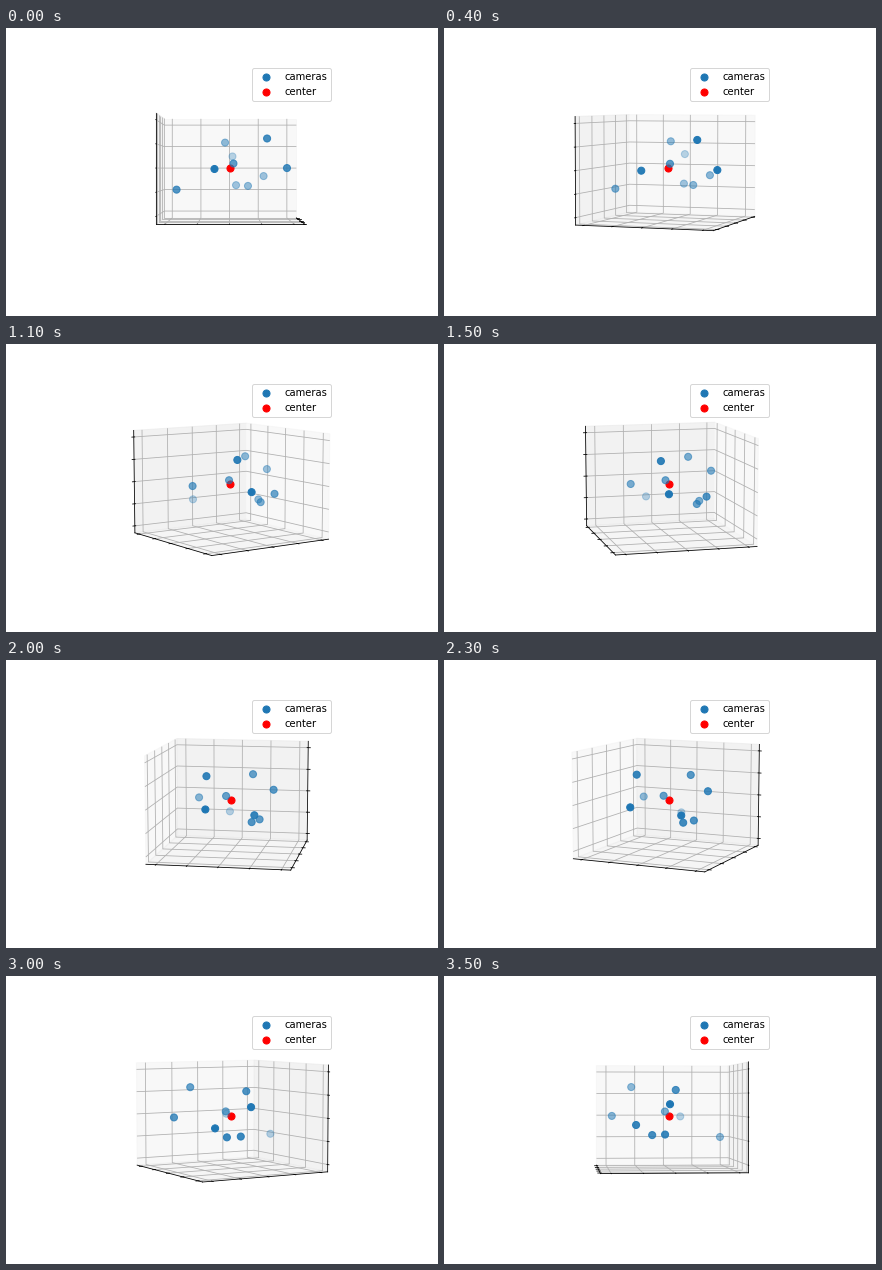
A matplotlib script that plays this animation: 432x288 px, repeating every 3600 ms.

```python
import math

import matplotlib.pyplot as plt
from matplotlib.animation import FuncAnimation

FRAMES = 36
TURN = 180      # degrees of azimuth per loop
TILT = 10       # highest elevation, reached halfway round
REACH = 2.305   # half the width of every axis

# Camera positions around the origin
CAMERAS = [
    (0.58, 1.22, 1.28), (-0.71, -0.15, 1.14), (-1.43, 0.10, 0.53),
    (0.14, 0.13, 0.20), (1.17, -0.48, -0.04), (0.49, 1.87, 0.00),
    (0.34, -1.73, -0.94), (-0.96, 1.15, -0.36), (-0.79, 0.62, -0.80),
    (-0.99, 0.22, -0.77),
]
MIDDLE = (0.016, 0.027, -0.012)

fig = plt.figure(figsize=(6, 4), dpi=72)
fig.subplots_adjust(left=0.125, right=0.9, bottom=0.125, top=0.88)
ax = fig.add_subplot(projection="3d")


def dots(points, color, label):
    ax.scatter(*zip(*points), s=50, color=color, label=label)


dots(CAMERAS, "tab:blue", "cameras")
dots([(0, 0, 0)], "red", "center")
ax.legend(loc="upper right")

for axis, mid in zip("xyz", MIDDLE):
    ax.set(**{
        f"{axis}lim": (mid - REACH, mid + REACH),
        f"{axis}ticks": range(-2, 3),
        f"{axis}ticklabels": [],
    })


def update(i):
    azim = TURN * i / FRAMES
    ax.view_init(elev=TILT * math.sin(math.radians(azim)), azim=azim)
    return ()


anim = FuncAnimation(fig, update, frames=FRAMES, interval=100,
                     repeat=True, repeat_delay=0)
plt.show()
```
